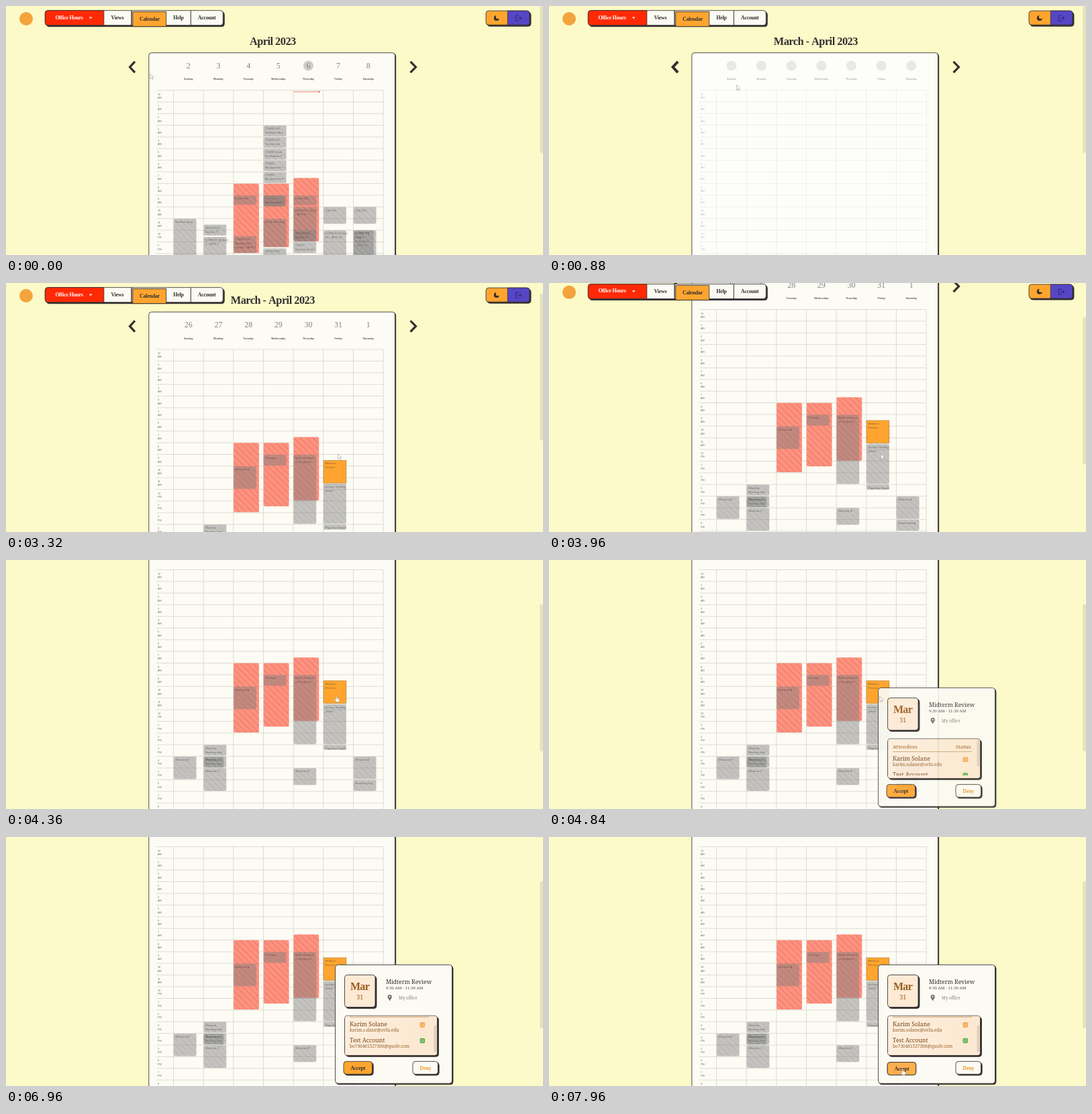
Animation, 800 px wide and 371 px high, one loop 8000 ms. Source, as an HTML page with a canvas:

```html
<!DOCTYPE html>
<html lang="en">
<head>
<meta charset="utf-8">
<title>Office hours calendar</title>
<style>
  html, body { margin: 0; width: 100%; height: 100%; overflow: hidden; background: #fcfac8; }
  canvas { display: block; width: 800px; height: 371px; }
</style>
</head>
<body>
<canvas id="stage"></canvas>
<script>
const W = 800, H = 371, LOOP = 8000;
const dpr = window.devicePixelRatio || 1;

function prepare(canvas) {
  canvas.width = W * dpr;
  canvas.height = H * dpr;
  const context = canvas.getContext('2d');
  context.scale(dpr, dpr);
  return context;
}

const stage = prepare(document.getElementById('stage'));
const layer = prepare(document.createElement('canvas'));
let ctx = stage;

const INK = '#332f30', PAPER = '#fcfbf3', ORANGE = '#ffa52f', BROWN = '#9a5d1e', PEACH = '#fdead5';
const RULE = '#d0cec7', FAINT = '#6d6a66';
const SERIF = '"Liberation Serif", serif', SLAB = '"Noto Serif", serif', SANS = '"Liberation Sans", sans-serif';
const GRID = { left: 224, x: 249.5, y: 125.5, col: 44.65, row: 17.38, right: 562 };
const DAYS = ['Sunday', 'Monday', 'Tuesday', 'Wednesday', 'Thursday', 'Friday', 'Saturday'];

// Key times in ms
const CLICK = 440, LOADED = 2580, OPEN = 4520, PRESS = 7600;

// Events: day, from hour, to hour, lines of text, optional width
const OFFICE = [[2, 8, 14], [3, 8, 13.5], [4, 7.5, 13]];
const APRIL = [
  [0, 11, 16, 'Bookkeeping'],
  [1, 11.5, 12.5, 'WITS/TOD|System 6'], [1, 12.55, 16, 'CORE/X: Module|5 - APR 3'],
  [2, 9, 9.85, 'Cmpt 148'], [2, 12.5, 14, 'CORE/ PS|Assignment;|course - APR 4'],
  [3, 3, 4, 'CORE/ PS|Software Ass'], [3, 4, 5, 'CORE/ PS|Verbal and'],
  [3, 5, 6, 'CORE/ Verb|Evaluation 5'], [3, 6, 7, 'CORE/|Assignment 7'],
  [3, 7, 8, 'CORE/|Assignment F'], [3, 9, 10, 'Therapy'], [3, 9, 10, '|Assessment 2', 31],
  [3, 11, 13.5, 'Block Working'], [3, 13.55, 16, 'WITS/TOD'],
  [4, 9, 9.9, 'Cmpt 148'], [4, 10, 13, 'WORLD: Lab 12|- APR 6'], [4, 12, 13, 'WITS/TOD|System 7'],
  [4, 13, 14, 'COPO:|Homework 12'],
  [5, 10, 11.5, 'Cyb Hck'], [5, 12, 16, 'CORE/X: Module|10 - APR 14'],
  [6, 10, 11.5, 'Cyb Hck'], [6, 12, 16, 'CORE/ PS|Final|Reflection|- APR 15'], [6, 12, 16, 'CORE/ PS|Peer 2', 30]
];
const MARCH = [
  [0, 16, 18, 'Workout B'],
  [1, 15, 16, 'Workout|Meeting with'], [1, 16, 17, 'Workshop w/|Meeting with'],
  [1, 16, 17, 'Workout w/', 30], [1, 17, 19, 'Workout C'],
  [2, 10, 12, 'Workout A'], [3, 9, 10, 'Therapy'],
  [4, 9, 15, 'Make Shadow|on Engineer'], [4, 17, 18.5, 'Workout B'],
  [5, 11.5, 15, 'Income Getting|points'], [5, 15, 15.5, 'Payment Grade'],
  [6, 16, 18, 'Workout A'], [6, 18, 19, 'Bookkeeping']
];

const clamp = v => Math.min(1, Math.max(0, v));
const smooth = p => p < .5 ? 2 * p * p : 1 - 2 * (1 - p) * (1 - p);
const ramp = (t, a, b) => smooth(clamp((t - a) / (b - a)));

// Eased value between [time, value] points
function track(t, keys) {
  let v = keys[0][1];
  for (let i = 1; i < keys.length; i++) {
    v += (keys[i][1] - keys[i - 1][1]) * ramp(t, keys[i - 1][0], keys[i][0]);
  }
  return v;
}

// Paints on a separate layer, so that overlapping shapes fade as one
function fadeGroup(alpha, paint) {
  layer.clearRect(0, 0, W, H);
  ctx = layer;
  paint();
  ctx = stage;
  ctx.globalAlpha = alpha;
  ctx.drawImage(layer.canvas, 0, 0, W, H);
  ctx.globalAlpha = 1;
}

function text(str, x, y, size, color, { font = SERIF, bold = false, align = 'left', gap = 0 } = {}) {
  ctx.font = `${bold ? 'bold ' : ''}${size}px ${font}`;
  ctx.letterSpacing = gap + 'px';
  ctx.textAlign = align;
  ctx.textBaseline = 'alphabetic';
  ctx.fillStyle = color;
  ctx.fillText(str, x, y);
}

function box(x, y, w, h, r, fill, stroke) {
  ctx.beginPath();
  ctx.roundRect(x, y, w, h, r);
  ctx.fillStyle = fill;
  ctx.fill();
  if (stroke) {
    ctx.strokeStyle = stroke;
    ctx.lineWidth = .85;
    ctx.stroke();
  }
}

function raised(x, y, w, h, fill, depth = 2) {
  box(x + depth, y + depth, w, h, 4, INK, INK);
  box(x, y, w, h, 4, fill, INK);
}

function line(points, color, width) {
  ctx.beginPath();
  points.forEach(([x, y], i) => i ? ctx.lineTo(x, y) : ctx.moveTo(x, y));
  ctx.strokeStyle = color;
  ctx.lineWidth = width;
  ctx.stroke();
}

function disc(x, y, r, color) {
  ctx.beginPath();
  ctx.arc(x, y, r, 0, Math.PI * 2);
  ctx.fillStyle = color;
  ctx.fill();
}

const hourY = h => GRID.y + h * GRID.row;
const dayX = d => GRID.x + d * GRID.col;

function block([day, from, to, label = ''], width, fill, hatch) {
  const x = dayX(day) + .3, y = hourY(from) + .3, h = hourY(to) - y - .8;
  box(x, y, width, h, 1.8, fill);
  if (hatch) {
    ctx.save();
    ctx.clip();
    for (let o = -h; o < width; o += 9.4) line([[x + o, y], [x + o + h, y + h]], hatch, .6);
    ctx.restore();
  }
  label.split('|').forEach((s, i) =>
    text(s, x + 2.5, y + 6 + i * 6, 4.3, 'rgba(60,55,50,.62)', { font: SANS, gap: .1 }));
}

function drawGrid() {
  const bottom = hourY(24);
  for (let h = 0; h <= 24; h++) {
    const y = hourY(h);
    line([[GRID.left, y], [GRID.right, y]], RULE, .7);
    if (h < 24) {
      const opt = { font: SANS };
      text(h % 12 || 12, 226, y + 7, 3.8, FAINT, opt);
      text(h < 12 ? 'AM' : 'PM', 226, y + 12.3, 3.8, FAINT, opt);
    }
  }
  for (let d = 0; d < 8; d++) line([[dayX(d), GRID.y], [dayX(d), bottom]], RULE, .7);
}

function drawCalendar(t) {
  const loading = t >= CLICK && t < LOADED;
  const april = t < CLICK;
  raised(212.8, 69.7, 366.7, 500, '#fcfbf4', 1.2);

  if (loading) {
    ctx.fillStyle = `rgba(255,255,255,${.6 * ramp(t, CLICK, 800)})`;
    ctx.fillRect(214, 71, 349, 498);
    ctx.globalAlpha = track(t, [[CLICK, 1], [800, .45], [2200, .36]]);
  }
  drawGrid();
  DAYS.forEach((name, d) => {
    const x = dayX(d) + GRID.col / 2;
    text(name, x, 110.4, 3.8, '#55524f', { font: SANS, bold: true, align: 'center' });
    if (loading) return;
    if (april && d === 4) disc(x, 89, 7.6, '#cfcdc9');
    const date = april ? d + 2 : (d + 25) % 31 + 1;
    text(date, x, 93, 12, '#85827e', { align: 'center' });
  });
  ctx.globalAlpha = 1;

  if (loading) {
    const shade = Math.round(track(t, [[CLICK, 222], [900, 232], [2000, 242]]));
    DAYS.forEach((_, d) => disc(dayX(d) + GRID.col / 2, 89, 7.6, `rgb(${shade},${shade},${shade - 3})`));
    return;
  }

  ctx.globalAlpha = april ? 1 : ramp(t, LOADED - 60, LOADED + 120);
  OFFICE.forEach(e => block(e, 37.8, '#ff917e', 'rgba(135,45,35,.52)'));
  (april ? APRIL : MARCH).forEach(e =>
    block(e, e[4] || 33.8, 'rgba(130,130,130,.47)', 'rgba(85,85,85,.3)'));
  if (april) {
    line([[428.5, 127.8], [466, 127.8]], '#f0604c', .8);
    disc(466.5, 127.8, 1.1, '#e8432f');
  } else {
    block([5, 9.5, 11.5, 'Midterm|Review'], 33.8, ORANGE);
    ctx.strokeStyle = '#a8701f';
    ctx.lineWidth = .6;
    ctx.strokeRect(dayX(5) + .3, hourY(9.5) + .3, 33.8, 2 * GRID.row - 1);
  }
  ctx.globalAlpha = 1;
}

function drawPage(t) {
  text(t < CLICK ? 'April 2023' : 'March - April 2023', 397.3, 58, 16.3, INK,
    { bold: true, align: 'center', gap: -.5 });
  const held = t > 300 && t < 1000;
  line([[192, 82.8], [184.5, 91], [192, 99.2]], INK, held ? 4 : 3.2);
  line([[602.5, 82.8], [610.5, 91], [602.5, 99.2]], INK, 3.2);
  drawCalendar(t);
}

function drawNav() {
  const label = (s, x, y, color = INK) => text(s, x, y, 8, color, { bold: true, align: 'center', gap: -.25 });
  disc(30, 19, 10, '#f3a43c');

  raised(58.3, 6.7, 265, 22, PAPER);
  box(58.3, 6.7, 87.5, 22, [4, 0, 0, 4], '#ff2a05', INK);
  line([[187, 7], [187, 29]], INK, 1.4);
  box(188.8, 8.6, 49.8, 22, 0, ORANGE, INK);
  line([[275.3, 7], [275.3, 29]], INK, 1);
  label('Office Hours', 94, 19.6, '#fff');
  ctx.beginPath();
  ctx.moveTo(123.8, 16.5);
  ctx.lineTo(128.4, 16.5);
  ctx.lineTo(126.1, 19.2);
  ctx.fillStyle = '#fff';
  ctx.fill();
  label('Views', 166, 20.2);
  label('Calendar', 214, 22);
  label('Help', 257, 20.2);
  label('Account', 299, 20.2);

  raised(715, 7.2, 65, 21, ORANGE);
  box(747.3, 7.2, 32.7, 21, [0, 4, 4, 0], '#5646c6', INK);
  disc(730.8, 18, 4, INK);
  disc(732.7, 16.2, 2.9, ORANGE);
  line([[764, 14.3], [759.5, 14.3], [759.5, 22.3], [764, 22.3]], '#352a78', 1.1);
  line([[762, 18.3], [767.5, 18.3]], '#352a78', 1.1);
  line([[765.3, 16], [767.7, 18.3], [765.3, 20.6]], '#352a78', 1.1);
}

function statusIcon(x, y, color) {
  box(x - 3.8, y - 3.8, 7.6, 7.6, 2.2, color);
  ctx.beginPath();
  ctx.arc(x, y, 2.1, 0, Math.PI * 2);
  ctx.strokeStyle = 'rgba(255,245,225,.75)';
  ctx.lineWidth = .7;
  ctx.stroke();
  line([[x - 1, y + .2], [x - .2, y + 1], [x + 1.2, y - .8]], 'rgba(255,245,225,.8)', .6);
}

function drawAttendees(t) {
  raised(504.5, 266.3, 138, 59, PEACH);
  const tint = ctx.createLinearGradient(505, 0, 642, 0);
  tint.addColorStop(0, '#fdeedd');
  tint.addColorStop(1, '#fce8d0');
  box(505, 266.8, 137, 58, 3.5, tint);

  const p = ramp(t, 6480, 6960);
  ctx.save();
  ctx.beginPath();
  ctx.rect(506, 267, 136, 54);
  ctx.clip();
  box(637.5, 267.5 + 13 * p, 4, 40, 1.5, '#dfd0bb');
  ctx.translate(0, -17.3 * p);
  const slab = { font: SLAB };
  text('Attendees', 512, 281.2, 7.8, BROWN, slab);
  text('Status', 606, 281.2, 7.8, BROWN, slab);
  line([[512, 285.6], [630, 285.6]], '#b98a55', .7);
  const people = [
    ['Karim Solane', 'karim.solane@ovlu.edu', '#f5a14a'],
    ['Test Account', 'bo730461527306@quolv.com', '#55ad45']
  ];
  people.forEach(([name, mail, color], i) => {
    const y = 299.2 + i * 23.6;
    text(name, 512, y, 8.7, '#7a4517', slab);
    text(mail, 512, y + 8, 6.5, '#94602a', slab);
    statusIcon(620.3, y - 2, color);
  });
  ctx.restore();
}

function drawPopup(t) {
  raised(490.5, 190.5, 174, 176.7, PAPER, 1.5);
  raised(504.5, 205.5, 45.5, 48, PEACH);
  text('Mar', 527, 228.3, 16, BROWN, { bold: true, align: 'center', gap: -.7 });
  text('31', 527.3, 242.3, 9, BROWN, { font: SLAB, align: 'center' });
  text('Midterm Review', 566, 218.6, 8.6, INK, { font: SLAB });
  text('9:30 AM - 11:30 AM', 566, 226.8, 6.1, '#4c4846', { font: SLAB });

  disc(571.7, 238.2, 3.1, '#77736f');
  ctx.beginPath();
  ctx.moveTo(568.8, 239.2);
  ctx.lineTo(571.7, 244.4);
  ctx.lineTo(574.6, 239.2);
  ctx.fill();
  disc(571.7, 238, 1.1, PAPER);
  text('My office', 585, 241.8, 6.3, '#85817c', { font: SLAB });

  drawAttendees(t);

  const label = { bold: true, align: 'center', gap: -.25 };
  const down = t >= PRESS;
  const dx = down ? 1.2 : 0;
  raised(503 + dx, 334.4 + dx, 42.5, 19, down ? '#ffb04d' : ORANGE, down ? 0 : 1.7);
  text('Accept', 524.2 + dx, 346.6 + dx, 8, INK, label);
  raised(606, 334.4, 37.5, 19, PAPER, 1.7);
  text('Deny', 625, 346.6, 8, '#e89a2c', label);
}

function pointer(points, x, y) {
  ctx.beginPath();
  points.forEach(([px, py]) => ctx.lineTo(x + px, y + py));
  ctx.closePath();
  ctx.fillStyle = '#fff';
  ctx.fill();
  ctx.strokeStyle = '#9a9793';
  ctx.lineWidth = .6;
  ctx.stroke();
}

function drawCursor(t) {
  const x = track(t, [[0, 214.8], [380, 188], [480, 188], [880, 279.5], [1640, 346], [2300, 349],
    [2560, 349], [3320, 494.5], [3960, 494.5], [4320, 492.5], [5080, 492.5], [5800, 535.5],
    [7060, 535.5], [7540, 527]]);
  const y = track(t, [[0, 100.8], [380, 91], [480, 91], [880, 117.5], [1640, 163], [2300, 167.5],
    [2560, 167.5], [3320, 254.5], [3960, 254.5], [4320, 203], [5080, 203], [5800, 286],
    [7060, 286], [7540, 346]]);
  const hand = t > 7400 || (t > 300 && t < 540) || (t > 4200 && t < OPEN);
  const overText = t > 5640 && t < 7200;
  if (hand) {
    pointer([[-.8, 0], [.6, 0], [.6, 3], [3.4, 3.7], [4.2, 4.8], [3.4, 8.5], [-.6, 8.5], [-3, 5.2], [-2.2, 4.6], [-.8, 5.6]], x, y);
  } else if (overText) {
    line([[x, y], [x, y + 6]], '#fffaf2', 1.1);
    line([[x - 1.3, y], [x + 1.3, y]], '#fffaf2', .8);
    line([[x - 1.3, y + 6], [x + 1.3, y + 6]], '#fffaf2', .8);
  } else {
    pointer([[0, 0], [0, 7.6], [1.8, 6.1], [3, 8.7], [4.2, 8.2], [3.1, 5.7], [5.2, 5.4]], x, y);
  }
}

function draw(t) {
  const scroll = track(t, [[3080, 0], [3500, 41.7], [3920, 86], [3970, 86], [4180, 111]]);
  const lift = 40 * ramp(t, 3890, 4170);
  ctx.fillStyle = '#fcfac8';
  ctx.fillRect(0, 0, W, H);

  ctx.save();
  ctx.translate(0, -scroll);
  drawPage(t);
  ctx.restore();

  ctx.save();
  ctx.translate(0, -lift);
  drawNav();
  ctx.restore();

  box(795.3, scroll * .594, 4.7, 219, 2, '#e4e1bf');
  if (t > OPEN) fadeGroup(clamp((t - OPEN) / 350), () => drawPopup(t));
  drawCursor(t);
}

const start = performance.now();
function tick() {
  draw((performance.now() - start) % LOOP);
  requestAnimationFrame(tick);
}
tick();
</script>
</body>
</html>
```
